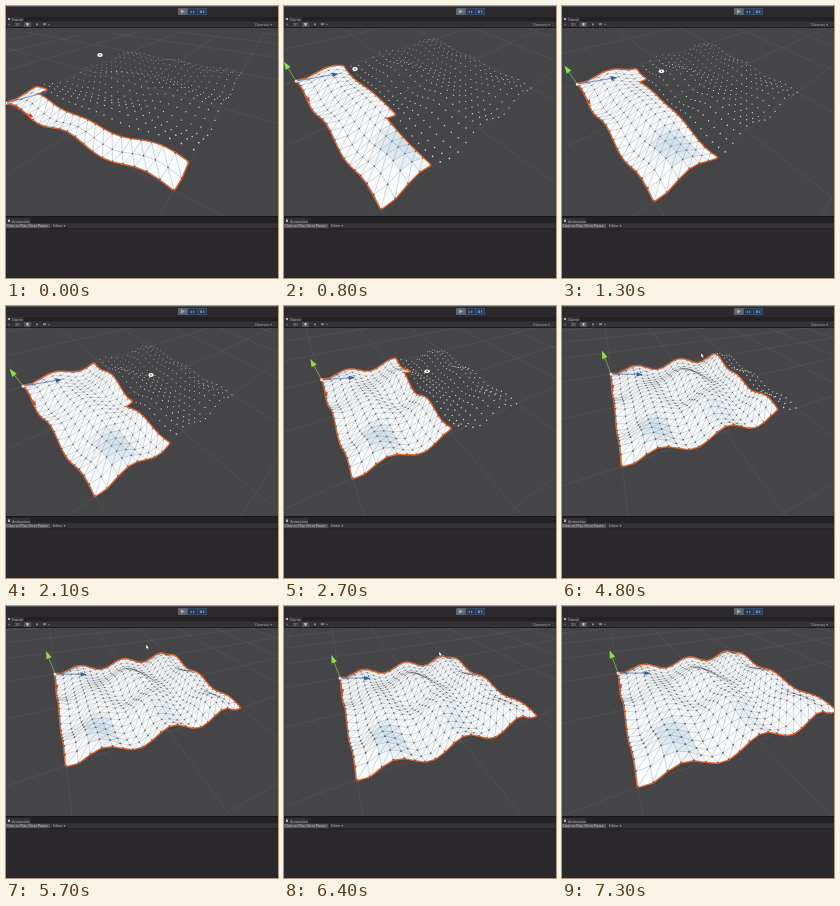
Animation, 272 px wide and 272 px high, one loop 7.4 s. Source, as an HTML page with a canvas:

```html
<!DOCTYPE html>
<html lang="en">
<head>
<meta charset="utf-8">
<title>Procedural terrain mesh</title>
<style>
html, body { margin: 0; width: 100%; height: 100%; overflow: hidden; background: #2a292b; }
canvas { display: block; width: 100vw; height: 100vh; }
</style>
</head>
<body>
<canvas id="stage"></canvas>
<script>
const SIZE = 272, LOOP = 7400, STEP = 100, N = 20;
const canvas = document.getElementById('stage');
const ctx = canvas.getContext('2d');

// Time, then the ground corners: origin, x end, far diagonal, z end.
const camera = [
  [0, 0, 97, 168, 184, 235, 67, 125, 46],
  [500, 3, 79, 125, 200, 259, 77, 142, 31],
  [800, 12, 75, 97, 203, 247, 82, 150, 33],
  [1600, 17, 80, 89, 190, 228, 89, 145, 40],
  [2100, 17, 80, 89, 190, 226, 89, 145, 40],
  [2500, 33, 76, 72, 177, 232, 96, 155, 43],
  [3200, 49, 68, 60, 160, 234, 102, 165, 49],
  [5700, 49, 68, 60, 160, 234, 102, 165, 49],
  [6400, 56, 72, 73, 174, 252, 110, 168, 52],
  [7200, 56, 67, 76, 181, 274, 105, 175, 47]
];
const upAxis = [[0, -14, -12], [800, -10, -16], [2100, -11, -14], [3200, -8, -20], [7200, -7, -19]];
const filledRows = [[0, 2.15], [800, 4.69], [2100, 8.57], [3900, 13.9], [5650, 20]];
const pointer = [[0, 94, 49], [800, 71, 63], [2100, 145, 69], [3900, 139, 58], [5700, 141, 41], [6400, 156, 48]];

function sample(keys, t) {
  const i = keys.findIndex(k => k[0] > t);
  if (i < 0) return keys[keys.length - 1].slice(1);
  const a = keys[i - 1], b = keys[i], f = (t - a[0]) / (b[0] - a[0]);
  return a.slice(1).map((v, j) => v + (b[j + 1] - v) * f);
}

function height(x, z) {
  const ends = Math.min(1, z / 2, (N - z) / 2);
  return ends * 0.55 * Math.cos(0.87 * (z - 3.4) + 0.7 * Math.sin(0.45 * x))
    + 0.4 * Math.sin(Math.PI / 4 * x) * Math.cos(0.35 * z);
}

// Maps grid coordinates to the screen through the four ground corners.
function makeProjection([ax, ay, bx, by, cx, cy, dx, dy]) {
  const x1 = bx - cx, y1 = by - cy, x2 = dx - cx, y2 = dy - cy;
  const sx = ax - bx + cx - dx, sy = ay - by + cy - dy;
  const det = x1 * y2 - x2 * y1;
  const g = (sx * y2 - x2 * sy) / det, h = (x1 * sy - sx * y1) / det;
  return (x, z, y = 0) => {
    const u = x / N, v = z / N, w = 1 + g * u + h * v;
    return {
      x: (ax + (bx * (1 + g) - ax) * u + (dx * (1 + h) - ax) * v) / w,
      y: (ay + (by * (1 + g) - ay) * u + (dy * (1 + h) - ay) * v) / w - 7.5 * y / w,
      w
    };
  };
}

function rect(x, y, w, h, color) {
  ctx.fillStyle = color;
  ctx.fillRect(x, y, w, h);
}

function label(text, x, y, color = '#a5a3a5', size = 4.2) {
  ctx.font = `${size}px Roboto, Arial, sans-serif`;
  ctx.fillStyle = color;
  ctx.fillText(text, x, y);
}

function polygon(points, close = true) {
  ctx.beginPath();
  points.forEach(p => ctx.lineTo(p.x, p.y));
  if (close) ctx.closePath();
}

function segment(a, b) {
  ctx.moveTo(a.x, a.y);
  ctx.lineTo(b.x, b.y);
}

function drawGround(project) {
  ctx.strokeStyle = 'rgba(150,150,152,.22)';
  ctx.lineWidth = 0.6;
  for (let k = -60; k <= 80; k += 10) {
    for (const at of [s => project(k, s), s => project(s, k)]) {
      ctx.beginPath();
      let last = null;
      for (let s = -60; s <= 80; s += 5) {
        const p = at(s), visible = p.w > 0.12 && p.w < 2.6;
        if (last && visible) segment(last, p);
        last = visible ? p : null;
      }
      ctx.stroke();
    }
  }
}

function drawMesh(project, progress) {
  const grid = Array.from({ length: N + 1 }, (_, z) =>
    Array.from({ length: N + 1 }, (_, x) => project(x, z, height(x, z))));
  const rows = Math.floor(progress), part = Math.floor((progress - rows) * N);
  const covered = (x, z) => z <= rows || (z === rows + 1 && part > 0 && x <= part);

  const edge = [];
  for (let x = 0; x <= N; x++) edge.push(grid[0][x]);
  for (let z = 1; z <= rows; z++) edge.push(grid[z][N]);
  for (let x = N - 1; x >= part; x--) edge.push(grid[rows][x]);
  if (part) for (let x = part; x >= 0; x--) edge.push(grid[rows + 1][x]);
  for (let z = rows; z > 0; z--) edge.push(grid[z][0]);

  polygon(edge);
  ctx.lineJoin = 'round';
  ctx.strokeStyle = '#e8682a';
  ctx.lineWidth = 2.7;
  ctx.stroke();
  ctx.fillStyle = '#fafbfc';
  ctx.fill();

  const wires = new Path2D();
  const wire = (a, b) => { wires.moveTo(a.x, a.y); wires.lineTo(b.x, b.y); };
  for (let z = 0; z <= rows && z < N; z++) {
    for (let x = 0; x < (z < rows ? N : part); x++) {
      const a = grid[z][x], b = grid[z][x + 1], c = grid[z + 1][x + 1], d = grid[z + 1][x];
      const shade = Math.max(0.27 * (1 - Math.hypot((x - 16.3) / 3.2, (z - 3) / 2.2) ** 2),
        0.12 * (1 - Math.hypot((x - 16) / 3, (z - 10.5) / 2) ** 2));
      if (shade > 0) {
        polygon([a, b, c, d]);
        ctx.fillStyle = `rgba(105,160,200,${shade})`;
        ctx.fill();
      }
      wire(a, b);
      wire(a, d);
      wire(b, d);
    }
  }
  ctx.strokeStyle = 'rgba(70,82,96,.62)';
  ctx.lineWidth = 0.36;
  ctx.stroke(wires);

  grid.forEach((line, z) => line.forEach((p, x) => {
    const r = Math.min(1.05, 0.62 / p.w);
    ctx.fillStyle = covered(x, z) ? 'rgba(65,68,74,.8)' : 'rgba(235,235,235,.88)';
    ctx.beginPath();
    ctx.arc(p.x, p.y, covered(x, z) ? r * 0.85 : r, 0, 7);
    ctx.fill();
  }));
}

function cone(from, to, color, length, width) {
  const angle = Math.atan2(to.y - from.y, to.x - from.x);
  ctx.save();
  ctx.translate(to.x, to.y);
  ctx.rotate(angle);
  polygon([{ x: length, y: 0 }, { x: -length, y: width }, { x: -length, y: -width }]);
  ctx.fillStyle = color;
  ctx.fill();
  ctx.restore();
}

function axis(from, to, color, length, width) {
  ctx.beginPath();
  segment(from, to);
  ctx.strokeStyle = color;
  ctx.lineWidth = 0.6;
  ctx.stroke();
  cone(from, to, color, length, width);
}

function drawGizmo(project, t) {
  const o = project(0, 0), [ux, uy] = sample(upAxis, t);
  const red = project(4.7, 0), blue = project(4, 0);
  const z = project(0, 4);
  blue.x = z.x + 1;
  blue.y = z.y + 5;
  axis(o, red, '#c9472a', 2.4, 2.2);
  axis(o, blue, '#2b5ca8', 3.2, 2.2);
  axis(o, { x: o.x + ux, y: o.y + uy }, '#8be052', 4, 2.8);
  rect(o.x - 1.2, o.y - 1, 2.5, 2.5, '#e4e4e4');
}

function drawPointer(t) {
  if (t >= 7200) return;
  const [x, y] = sample(pointer, t);
  if (t < 3200) {
    ctx.beginPath();
    ctx.ellipse(x, y, 2.7, 1.9, 0, 0, 7);
    ctx.fillStyle = '#fff';
    ctx.fill();
    ctx.beginPath();
    ctx.arc(x, y, 0.8, 0, 7);
    ctx.fillStyle = '#555';
    ctx.fill();
    return;
  }
  polygon([[-1, -2.5], [-1, 2], [0, 1.1], [0.8, 2.8], [1.6, 2.4], [0.9, 0.8], [2.1, 0.7]]
    .map(([px, py]) => ({ x: x + px, y: y + py })));
  ctx.fillStyle = '#fff';
  ctx.fill();
  ctx.strokeStyle = '#222';
  ctx.lineWidth = 0.3;
  ctx.stroke();
}

function drawPanels() {
  rect(0, 0, SIZE, 22, '#2b292c');
  rect(0, 0, SIZE, 1, '#514f52');
  rect(172, 2, 29, 7, '#4b5a72');
  rect(172.5, 2.5, 8.6, 6, '#6b665f');
  rect(182, 2.5, 9, 6, '#26364f');
  rect(191.6, 2.5, 9, 6, '#303d52');
  polygon([{ x: 175, y: 3.6 }, { x: 179, y: 5.5 }, { x: 175, y: 7.4 }]);
  ctx.fillStyle = '#86b2e8';
  ctx.fill();
  rect(184.6, 4.7, 1.3, 2.5, '#5689d0');
  rect(187, 4.7, 1.3, 2.5, '#5689d0');
  rect(194, 4.4, 2, 2.6, '#5689d0');
  rect(197, 4.4, 1.2, 2.6, '#5689d0');

  rect(0, 11, SIZE, 4.5, '#222023');
  rect(0, 11, 18, 4.5, '#343235');
  rect(2, 12, 2, 2, '#b5b3b5');
  label('Game', 6, 14.6);
  rect(0, 15.5, SIZE, 5.5, '#343235');
  rect(0, 21, SIZE, 1, '#1d1c1e');
  label('▾', 2, 19.7, '#777');
  label('2D', 9, 19.8);
  rect(18, 16, 7, 5, '#555357');
  rect(20.5, 17, 2, 2.5, '#d0d0d0');
  rect(30, 17.5, 2, 1.8, '#888');
  rect(37, 17.2, 3, 2, '#858386');
  label('▾', 42, 19.7, '#777');
  label('Gizmos', 249, 19.7);
  label('▾', 264, 19.7, '#888');

  rect(0, 210, SIZE, 62, '#2a282b');
  rect(0, 210, SIZE, 1.5, '#19181a');
  rect(0, 212, SIZE, 5, '#242225');
  rect(0, 212, 24, 5, '#343235');
  rect(2, 213.5, 2, 2.5, '#b5b3b5');
  label('Animation', 6, 216.6, '#aaa8aa', 4);
  rect(0, 217.5, SIZE, 5, '#343235');
  rect(0, 217.8, 44, 4.5, '#565458');
  label('Clear on Play | Error Pause', 0.5, 221.4, '#c0bec0', 3.5);
  label('Editor ▾', 47, 221.4, '#b0aeb0', 3.7);
  rect(0, 222.5, SIZE, 0.7, '#1c1b1d');
}

function draw(t) {
  const scale = devicePixelRatio || 1;
  const width = Math.round(innerWidth * scale), high = Math.round(innerHeight * scale);
  if (canvas.width !== width || canvas.height !== high) {
    canvas.width = width;
    canvas.height = high;
  }
  ctx.setTransform(width / SIZE, 0, 0, high / SIZE, 0, 0);
  rect(0, 0, SIZE, SIZE, '#454447');
  const project = makeProjection(sample(camera, t));
  drawGround(project);
  drawMesh(project, sample(filledRows, t)[0]);
  drawGizmo(project, t);
  drawPointer(t);
  drawPanels();
}

const start = performance.now();
function tick() {
  const t = (performance.now() - start) % LOOP;
  draw(Math.floor(t / STEP) * STEP);
  requestAnimationFrame(tick);
}
tick();
</script>
</body>
</html>
```
